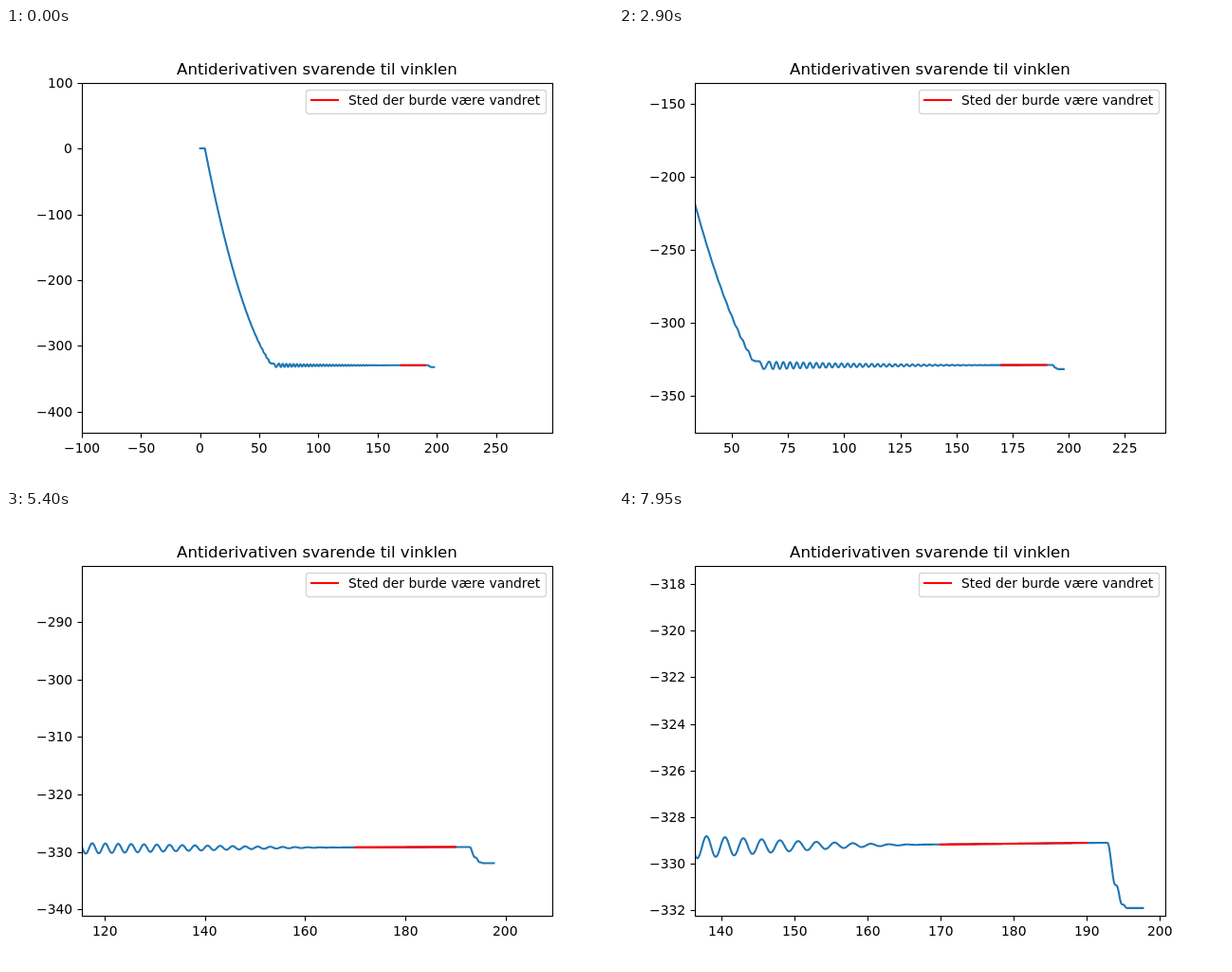
Animation, 640 px wide and 480 px high, one loop 8 s. Source, as an HTML page with a canvas:

```html
<!DOCTYPE html>
<html lang="da">
<head>
<meta charset="utf-8">
<title>Antiderivativen svarende til vinklen</title>
<style>
  html, body { margin: 0; width: 100%; height: 100%; overflow: hidden; background: #fff; }
  canvas { display: block; }
</style>
</head>
<body>
<canvas id="stage" width="640" height="480"></canvas>
<script>
const ctx = document.getElementById('stage').getContext('2d');

const LOOP = 8000, HOLD = 1500, STEP = 50, ZOOM_RATE = 0.02744;
const PT = 100 / 72;                       // pixels per point
const BOX = { left: 80, right: 576, top: 57.6, bottom: 427.2 };
const START = { left: -100, right: 297.7, bottom: -432, top: 100 };
const GOAL = { left: 143.27, right: 197.94, bottom: -329.36, top: -329.32 };
const DATA_END = 197.7;

const linear = p => p;
const smooth = p => p * p * (3 - 2 * p);

// Interpolates between [x, y] points with the given easing.
function through(points, x, ease = linear) {
  if (x <= points[0][0]) return points[0][1];
  for (let i = 1; i < points.length; i++) {
    const [x0, y0] = points[i - 1], [x1, y1] = points[i];
    if (x <= x1) return y0 + (y1 - y0) * ease((x - x0) / (x1 - x0));
  }
  return points[points.length - 1][1];
}

const SETTLE = [[60, -326.4], [62.2, -326.6], [64.2, -331.9], [66.6, -326.8]];
const MIDLINE = [[66, -329.4], [120, -329.35], [140, -329.28], [168, -329.19], [193, -329.11]];
const AMPLITUDE = [[66, 2.6], [80, 2], [95, 1.4], [117, 0.9], [128, 0.67], [138, 0.46],
                   [148, 0.25], [156, 0.12], [163, 0.03], [168, 0]];
const DROP = [[192.85, -329.11], [193.9, -330.92], [194.1, -330.95], [194.8, -331.75],
              [195, -331.77], [195.5, -331.92], [DATA_END, -331.92]];

function signal(x) {
  if (x < 4) return 0;
  if (x < 60) {
    const u = x - 4;
    const ripple = (x / 60) ** 5 * Math.cos(2 * Math.PI * (x - 60) / 2.5);
    return -9.14 * u + 0.0588 * u * u + ripple;
  }
  if (x < 66.6) return through(SETTLE, x, smooth);
  if (x > 192.85) return through(DROP, x, smooth);
  const d = 163 - x;
  const cycles = 0.402 * d - 3.05e-6 * d ** 3;
  return through(MIDLINE, x) + through(AMPLITUDE, x) * Math.cos(2 * Math.PI * cycles);
}

const curve = [];
for (let i = 0; i <= DATA_END * 10; i++) curve.push([i / 10, signal(i / 10)]);
const levelLine = [[170, -329.19], [190, -329.11]];

function ticks(low, high) {
  const raw = (high - low) / 9;
  const scale = 10 ** Math.floor(Math.log10(raw));
  const step = scale * [1, 2, 2.5, 5, 10].find(s => s * scale >= raw - 1e-9);
  const digits = Number.isInteger(step) ? 0 : 1;
  const list = [];
  for (let i = Math.ceil(low / step - 1e-9); i * step <= high + 1e-9; i++) {
    const label = Math.abs(i * step).toFixed(digits);
    list.push({ value: i * step, label: (i < 0 ? '\u2212' : '') + label });
  }
  return list;
}

const snap = v => Math.round(v) + 0.5;

function stroke(points, color, width, cap = 'butt') {
  ctx.beginPath();
  for (const [x, y] of points) ctx.lineTo(x, y);
  ctx.strokeStyle = color;
  ctx.lineWidth = width * PT;
  ctx.lineCap = cap;
  ctx.lineJoin = 'round';
  ctx.stroke();
}

// align is the share of the text width that lies left of x.
function write(text, x, y, align, size = 10) {
  ctx.font = `${size * PT}px "DejaVu Sans", sans-serif`;
  ctx.fillStyle = '#000';
  ctx.fillText(text, Math.round(x - align * ctx.measureText(text).width), Math.round(y));
}

function drawAxes(view, toX, toY) {
  for (const { value, label } of ticks(view.left, view.right)) {
    const x = toX(value);
    stroke([[snap(x), 427.5], [snap(x), 432.5]], '#000', 0.8);
    write(label, x, 448, 0.5);
  }
  for (const { value, label } of ticks(view.bottom, view.top)) {
    const y = toY(value);
    stroke([[75.5, snap(y)], [80.5, snap(y)]], '#000', 0.8);
    write(label, 70.3, y + 5, 1);
  }
  ctx.lineJoin = 'miter';
  ctx.strokeStyle = '#000';
  ctx.lineWidth = 0.8 * PT;
  ctx.strokeRect(80.5, 58.5, 496, 369);
}

function drawLegend() {
  ctx.beginPath();
  ctx.roundRect(316.5, 65.5, 253, 25, 2.8);
  ctx.fillStyle = '#fff';
  ctx.fill();
  ctx.strokeStyle = 'rgba(204, 204, 204, 0.8)';
  ctx.lineWidth = PT;
  ctx.stroke();
  stroke([[322, 76], [350, 76]], '#f00', 1.5, 'square');
  write('Sted der burde være vandret', 361, 81, 0);
}

function draw(time) {
  const step = time < HOLD ? 0 : Math.floor((time - HOLD) / STEP) + 1;
  const rest = Math.exp(-ZOOM_RATE * step);
  const view = {};
  for (const side in GOAL) view[side] = GOAL[side] + (START[side] - GOAL[side]) * rest;

  const scaleX = (BOX.right - BOX.left) / (view.right - view.left);
  const scaleY = (BOX.bottom - BOX.top) / (view.top - view.bottom);
  const toX = x => BOX.left + (x - view.left) * scaleX;
  const toY = y => BOX.top + (view.top - y) * scaleY;
  const place = points => points.map(([x, y]) => [toX(x), toY(y)]);

  ctx.fillStyle = '#fff';
  ctx.fillRect(0, 0, 640, 480);
  ctx.save();
  ctx.beginPath();
  ctx.rect(80, 58, 496, 369);
  ctx.clip();
  stroke(place(curve), '#1f77b4', 1.5, 'square');
  stroke(place(levelLine), '#f00', 1.5, 'square');
  ctx.restore();
  drawAxes(view, toX, toY);
  write('Antiderivativen svarende til vinklen', 328, 49, 0.5, 12);
  drawLegend();
}

function tick() {
  draw(performance.now() % LOOP);
  requestAnimationFrame(tick);
}
tick();
</script>
</body>
</html>
```
